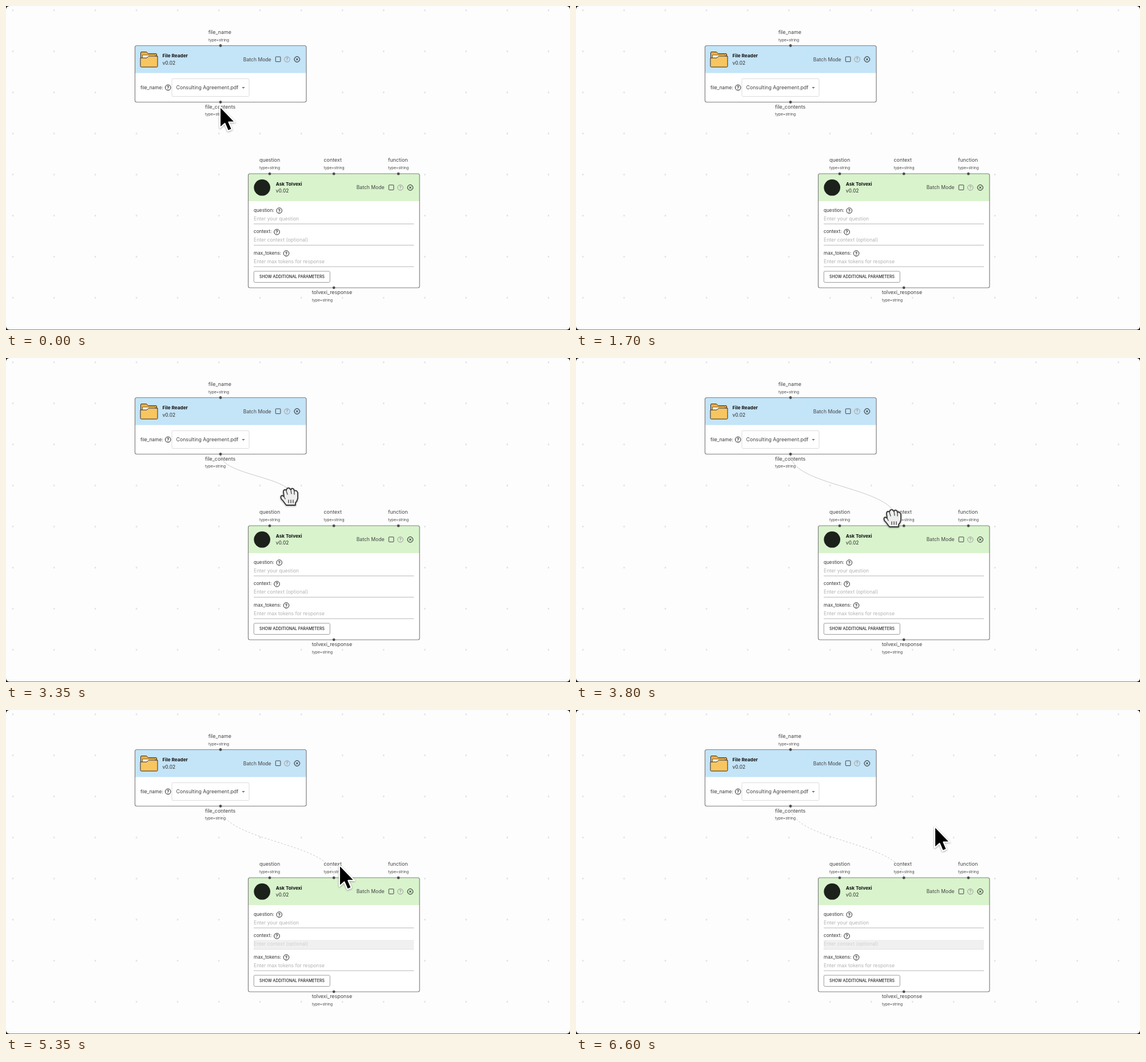
Recreate the animation shown at these times as an HTML page. Size 986 by 568 pixels, loop 6650 ms.

```html
<!DOCTYPE html>
<html lang="en">
<head>
<meta charset="utf-8">
<title>Node connection</title>
<style>
  html, body { margin: 0; width: 100%; height: 100%; overflow: hidden; background: #17171f; }
  svg { display: block; width: 986px; height: 568px; }
  text { font: 8.6px Inter, "Open Sans", sans-serif; fill: #444; white-space: pre; }
  .name { font-size: 8.9px; }
  .type { font-size: 6.6px; }
  .title { font-size: 8.2px; font-weight: 700; fill: #111; }
  .version { font-size: 8.3px; font-weight: 500; fill: #444; }
  .label { font-size: 8.2px; fill: #333; }
  .value { font-size: 8.75px; }
  .hint { fill: #b2b2b2; }
  .button { font-size: 6.9px; font-weight: 500; fill: #222; }
  .mark { font-size: 8px; font-weight: 600; text-anchor: middle; fill: currentColor; }
  .frame { fill: none; stroke: #808080; stroke-width: 1.2; }
  .rule { stroke: #a4a4a4; stroke-width: .8; }
  .port { fill: #505050; }
  .icon { fill: none; stroke: currentColor; stroke-width: 1; }
  .edge { fill: none; stroke: #bababe; stroke-width: .8; }
  .cursor { filter: drop-shadow(0 1.5px 1.5px rgba(0, 0, 0, .35)); }
</style>
</head>
<body>
<svg viewBox="0 0 986 568">
  <defs>
    <pattern id="grid" x="-24" y="-28.5" width="72.03" height="72" patternUnits="userSpaceOnUse">
      <path d="M34.5 36h3M36 34.5v3" stroke="#d6d6da" stroke-width="1"/>
    </pattern>
    <g id="help">
      <circle class="icon" r="4.8"/>
      <text class="mark" y="2.9">?</text>
    </g>
    <g id="controls">
      <text x="-94" y="3">Batch Mode</text>
      <rect class="icon" x="-37.5" y="-4.5" width="8.6" height="8.6" rx=".8" color="#444"/>
      <use href="#help" x="-17.3" color="#999"/>
      <circle class="icon" r="4.8" color="#111"/>
      <path class="icon" d="M-2-2L2 2M2-2L-2 2" stroke-width="1.3" color="#111"/>
    </g>
  </defs>

  <rect width="986" height="567.4" rx="6" fill="#fdfdfd"/>
  <rect width="986" height="567.4" rx="6" fill="url(#grid)"/>

  <!-- File node -->
  <rect x="225.5" y="69.5" width="299.5" height="99" rx="3" fill="#fff"/>
  <path d="M225.5 117.5V72.5a3 3 0 0 1 3-3H522a3 3 0 0 1 3 3V117.5z" fill="#c4e4f7"/>
  <rect class="frame" x="225.5" y="69.5" width="299.5" height="99" rx="3"/>
  <g stroke="#2b2b2b" stroke-linejoin="round">
    <path d="M235.5 105V82a1.5 1.5 0 0 1 1.5-1.5H245.5l3 3H262a1.5 1.5 0 0 1 1.5 1.5V105z" fill="#f0b042"/>
    <path d="M238.5 92V86H261V92z" fill="#fff" stroke-width=".7"/>
    <path d="M235 91H246l3.5-3H265V105.5a1.5 1.5 0 0 1-1.5 1.5H236.5a1.5 1.5 0 0 1-1.5-1.5z" fill="#f8c660"/>
  </g>
  <text class="title" x="273.5" y="90">File Reader</text>
  <text class="version" x="273.5" y="102.5">v0.02</text>
  <use href="#controls" x="508.8" y="93.5"/>
  <text class="label" x="235" y="145.5">file_name:</text>
  <use href="#help" x="283.2" y="143" color="#222"/>
  <rect x="290" y="127.5" width="135" height="31" rx="2" fill="#fff" stroke="#dcdcdc"/>
  <text class="value" x="297.5" y="145.7">Consulting Agreement.pdf</text>
  <path d="M412.3 142h5.4l-2.7 2.9z" fill="#777"/>
  <text class="name" x="353.7" y="49">file_name</text>
  <text class="type" x="354" y="62">type=string</text>
  <text class="name" x="348" y="180">file_contents</text>
  <text class="type" x="348" y="192">type=string</text>

  <!-- Question node -->
  <rect x="423.5" y="294" width="299.5" height="200" rx="3" fill="#fff"/>
  <path d="M423.5 342V297a3 3 0 0 1 3-3H720a3 3 0 0 1 3 3V342z" fill="#d9f3cd"/>
  <rect class="frame" x="423.5" y="294" width="299.5" height="200" rx="3"/>
  <circle cx="447.7" cy="318.3" r="14.3" fill="#1c211b"/>
  <text class="title" x="471.7" y="314.7">Ask Tolvexi</text>
  <text class="version" x="471.7" y="327">v0.02</text>
  <use href="#controls" x="706.7" y="318.3"/>
  <text class="label" x="433" y="361">question:</text>
  <use href="#help" x="477.7" y="358.7" color="#222"/>
  <text class="hint" x="433" y="375.7">Enter your question</text>
  <path class="rule" d="M433 382H713"/>
  <text class="label" x="433" y="398.3">context:</text>
  <use href="#help" x="473.5" y="396.2" color="#222"/>
  <rect id="shade" x="433" y="403" width="280" height="15.5" fill="#f0f0f0"/>
  <text id="hint" class="hint" x="433" y="413">Enter context (optional)</text>
  <path id="rule" class="rule" d="M433 419.3H713"/>
  <text class="label" x="433" y="436">max_tokens:</text>
  <use href="#help" x="490" y="433.7" color="#222"/>
  <text class="hint" x="433" y="450.7">Enter max tokens for response</text>
  <path class="rule" d="M433 457H713"/>
  <rect x="433.3" y="465" width="133" height="19.5" rx="2" fill="#fff" stroke="#909090" stroke-width=".9"/>
  <text class="button" x="443" y="477.3">SHOW ADDITIONAL PARAMETERS</text>
  <text class="name" x="443" y="273.3">question</text>
  <text class="type" x="443" y="286.3">type=string</text>
  <text class="name" x="555.5" y="273.3">context</text>
  <text class="type" x="555.5" y="286.3">type=string</text>
  <text class="name" x="668" y="273.3">function</text>
  <text class="type" x="668" y="286.3">type=string</text>
  <text class="name" x="534.7" y="505.3">tolvexi_response</text>
  <text class="type" x="535" y="517.5">type=string</text>

  <path id="edge" class="edge"/>
  <g class="port">
    <circle cx="375" cy="69.5" r="2.4"/>
    <circle cx="375" cy="168.5" r="2.4"/>
    <circle cx="461" cy="294.2" r="2.4"/>
    <circle cx="573.2" cy="294.2" r="2.4"/>
    <circle cx="686" cy="294.2" r="2.4"/>
    <circle cx="573.2" cy="493.8" r="2.4"/>
  </g>

  <!-- Pointers, each with its hot spot at 0,0 -->
  <g id="arrow" class="cursor">
    <path d="M-1-2V35.5L7.5 28L13 41L20 38L14.500 25.500H25.500Z" fill="#000" stroke="#fff" stroke-width="2.2" stroke-linejoin="round"/>
  </g>
  <g id="hand" class="cursor" stroke="#333" stroke-linejoin="round" stroke-linecap="round">
    <path d="M-8 15L-14 7Q-19 3-17-1Q-15-3-12 0L-13-8Q-13-12-10-12L-8-11Q-7-16-3-15L0-12Q2-16 5-13L6-10Q10-12 12-7V3Q11 8 8 11V15Z" fill="#eee" stroke-width="1.8"/>
    <path d="M-8-10L-6-4M0-12L1-5M6-9V-4M-12 0L-10 4M-4 6V11M0 6V11M4 6V11" fill="none" stroke="#555" stroke-width="1.5"/>
  </g>
  <g id="cross" class="cursor" fill="none" stroke-linecap="square">
    <path d="M-13 0H13M0-13V13" stroke="#fff" stroke-width="4"/>
    <path d="M-13 0H13M0-13V13" stroke="#111" stroke-width="1.8"/>
  </g>
</svg>
<script>
  const LOOP = 6650, STEP = 50;
  const DRAG = 2650, HAND = 3000, SNAP = 4050, LINK = 4950, LEAVE = 5250;
  const START = [375, 168.5], END = [573.2, 294.2];
  const $ = id => document.getElementById(id);

  // Keys are [time, x, y].
  const approach = [[0, 375, 178], [400, 375, 177], [900, 375, 169]];
  const pull = [[DRAG, ...START], [2850, 401, 199], [3350, 502, 245], [3800, 560, 283], [SNAP, ...END]];
  const depart = [[LINK, ...END], [5500, 590, 263], [5950, 612, 234], [6600, 628, 206]];

  // Smooth path through timed points, at rest at both ends.
  function follow(keys, t) {
    const last = keys.length - 1;
    if (t <= keys[0][0]) return keys[0].slice(1);
    if (t >= keys[last][0]) return keys[last].slice(1);
    const i = keys.findIndex(k => k[0] > t) - 1;
    const a = keys[i], b = keys[i + 1], span = b[0] - a[0], u = (t - a[0]) / span;
    const slope = (n, c) => n === 0 || n === last ? 0
      : (keys[n + 1][c] - keys[n - 1][c]) / (keys[n + 1][0] - keys[n - 1][0]);
    return [1, 2].map(c =>
      a[c] + (b[c] - a[c]) * u * u * (3 - 2 * u)
      + span * u * (1 - u) * ((1 - u) * slope(i, c) - u * slope(i + 1, c)));
  }

  function curve([x, y]) {
    const [sx, sy] = START, mid = (sy + y) / 2;
    return `M${sx} ${sy}C${sx} ${mid} ${x} ${mid} ${x} ${y}`;
  }

  function show(id, on) { $(id).style.display = on ? "" : "none"; }

  function place(id, on, [x, y]) {
    show(id, on);
    $(id).setAttribute("transform", `translate(${x} ${y})`);
  }

  function draw(t) {
    const tip = follow(pull, t), linked = t >= LINK;
    show("edge", t > DRAG);
    $("edge").setAttribute("d", curve(tip));
    $("edge").style.strokeDasharray = linked ? "3 3" : "none";
    $("edge").style.strokeDashoffset = linked ? -((t - LINK) % 500) / 500 * 6 : 0;

    show("shade", linked);
    $("hint").style.fill = linked ? "#d0d0d0" : "";
    $("rule").style.strokeDasharray = linked ? "1 1" : "none";

    place("arrow", t < 1000 || t >= LEAVE, follow(t < LINK ? approach : depart, t));
    place("hand", t >= HAND && t < SNAP, [tip[0] - 4, tip[1] - 2]);
    place("cross", t >= SNAP && t < LEAVE, follow(depart, t));
  }

  const origin = performance.now();
  function tick() {
    const t = (performance.now() - origin) % LOOP;
    draw(Math.floor(t / STEP) * STEP);
    requestAnimationFrame(tick);
  }
  tick();
</script>
</body>
</html>
```
